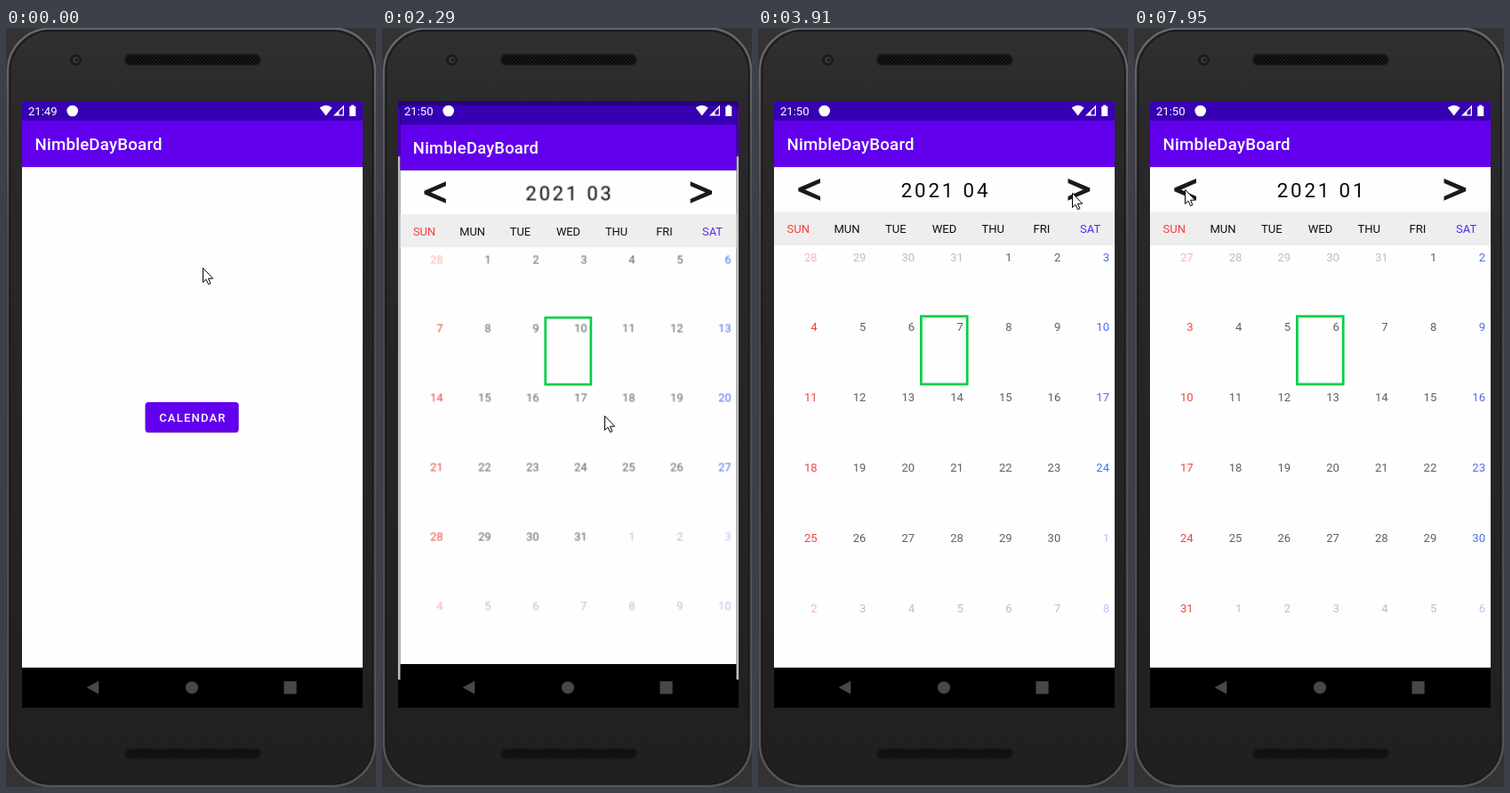
Write an HTML page that moves like this. It is 416 by 852 pixels and loops after 8 s.

```html
<!DOCTYPE html>
<html lang="en">
<head>
<meta charset="utf-8">
<title>Calendar demo</title>
<style>
  /* registered, so that the scaled text is redrawn sharply at every size */
  @property --zoom { syntax: "<number>"; inherits: false; initial-value: 1; }
  @property --fade { syntax: "<number>"; inherits: false; initial-value: 0; }

  html, body { margin: 0; width: 100%; height: 100%; overflow: hidden; background: #333; }
  svg { display: block; width: 416px; height: 852px; font-family: Roboto, sans-serif; }
  .mid { text-anchor: middle; }
  .title { font-size: 18.64px; font-weight: 500; letter-spacing: .0125em; fill: #fff; }
  .button { font-size: 13.05px; font-weight: 500; letter-spacing: .0893em; fill: #fff; }
  .clock { font-size: 13.05px; fill: #fff; }
  .head { font-size: 13.05px; fill: #111; }
  .head .sun { fill: #f5403c; }
  .head .sat { fill: #5a2cf5; }
  .name { font-size: 22.37px; letter-spacing: .125em; fill: #0a0a0a; }
  .day { font-size: 13.05px; text-anchor: end; fill: #5f5f5f; }
  .day.sun { fill: #ee4540; }
  .day.sat { fill: #4a6cec; }
  .day.out { opacity: .4; }

  /* every part shares one 8 s clock; 1% = 80 ms */
  .anim { animation: 8s step-end infinite; }
  #cursor { animation-name: cursor; }
  #early { animation-name: early; }
  #late { animation-name: late; }
  #prev { animation-name: press; }
  #m1 { animation-name: m1; }
  #m2 { animation-name: m2; }
  #m3 { animation-name: m3; }
  #m4 { animation-name: m4; }
  #home, #calendar { transform-origin: 209.5px 422px; transform: scale(var(--zoom)); }
  #home { animation: zoom-out 8s linear infinite; }
  #dim { opacity: var(--fade); animation: dim 8s linear infinite; }
  #calendar { opacity: var(--fade); animation: zoom-in 8s linear infinite, reveal 8s linear infinite; }
  #ripple { transform-origin: 250px 435px; animation: ripple 8s linear infinite; }

  @keyframes cursor {
    0%      { transform: translate(221px, 269px); }
    3.5%    { transform: translate(222px, 268px); animation-timing-function: steps(2); }
    5.5%    { transform: translate(224px, 266px); }
    12.125% { transform: translate(226px, 272px); animation-timing-function: steps(3); }
    15.125% { transform: translate(246px, 330px); animation-timing-function: steps(2); }
    17.125% { transform: translate(257px, 395px); animation-timing-function: steps(2); }
    19%     { transform: translate(249px, 426px); animation-timing-function: steps(2); }
    21%     { transform: translate(250px, 432px); }
    22.875% { transform: translate(250px, 435px); }
    33.5%   { transform: translate(252px, 428px); animation-timing-function: steps(4); }
    37.375% { transform: translate(284px, 325px); animation-timing-function: steps(4); }
    41.125% { transform: translate(321px, 227px); animation-timing-function: steps(2); }
    43%     { transform: translate(339px, 206px); }
    44%     { transform: translate(347px, 190px); }
    45%     { transform: translate(352px, 177px); }
    46%     { transform: translate(353px, 185px); }
    56.5%   { transform: translate(354px, 187px); }
    57.5%   { transform: translate(330px, 193px); animation-timing-function: steps(3); }
    60.375% { transform: translate(115px, 190px); }
    61.25%  { transform: translate(85px, 187px); }
    62.25%  { transform: translate(73px, 186px); }
    64.375% { transform: translate(72px, 185px); }
    65.25%  { transform: translate(69px, 184px); animation-timing-function: steps(3); }
    68.125%, 100% { transform: translate(57px, 181px); }
  }
  @keyframes early { 0% { opacity: 1; } 21%, 100% { opacity: 0; } }
  @keyframes late { 0% { opacity: 0; } 21%, 100% { opacity: 1; } }
  @keyframes press {
    0%, 70.25%, 77.875%, 85.875%, 99.375%, 100% { fill: #1a1a1a; }
    68.125%, 76%, 83.75%, 97.5% { fill: #3c3c3c; }
  }
  @keyframes m3 { 0%, 70.25% { opacity: 1; } 47.875%, 77.875%, 100% { opacity: 0; } }
  @keyframes m4 { 0%, 70.25%, 100% { opacity: 0; } 47.875% { opacity: 1; } }
  @keyframes m2 { 0%, 85.875%, 100% { opacity: 0; } 77.875% { opacity: 1; } }
  @keyframes m1 { 0% { opacity: 0; } 85.875%, 100% { opacity: 1; } }

  /* screen change: quick start, very slow finish */
  @keyframes zoom-out {
    0%, 26.65% { --zoom: 1; animation-timing-function: cubic-bezier(.3, 0, .8, .15); }
    27.483% { --zoom: 1.02; animation-timing-function: cubic-bezier(.05, .7, .1, 1); }
    31.65%, 100% { --zoom: 1.05; }
  }
  @keyframes zoom-in {
    0%, 26.65% { --zoom: .85; animation-timing-function: cubic-bezier(.3, 0, .8, .15); }
    27.483% { --zoom: .91; animation-timing-function: cubic-bezier(.05, .7, .1, 1); }
    31.65%, 100% { --zoom: 1; }
  }
  @keyframes reveal { 0%, 27.09% { --fade: 0; } 27.71%, 100% { --fade: 1; } }
  @keyframes dim { 0%, 26.65% { --fade: 0; } 28%, 100% { --fade: .25; } }
  @keyframes ripple {
    0%, 22.8% { transform: scale(0); opacity: .24; }
    25.7% { transform: scale(1); opacity: .24; }
    28%, 100% { transform: scale(1); opacity: 0; }
  }
</style>
</head>
<body>
<svg viewBox="0 0 416 852">
  <defs>
    <linearGradient id="body" x2="0" y2="1">
      <stop offset="0" stop-color="#303030"/>
      <stop offset=".12" stop-color="#292929"/>
      <stop offset="1" stop-color="#202020"/>
    </linearGradient>
    <linearGradient id="rim" x2="0" y2="1">
      <stop offset="0" stop-color="#6a6770"/>
      <stop offset=".3" stop-color="#484848"/>
      <stop offset="1" stop-color="#555"/>
    </linearGradient>
    <pattern id="mesh" width="4" height="4" patternUnits="userSpaceOnUse">
      <path d="M0 0h2v2H0zM2 2h2v2H2z" fill="#090909"/>
    </pattern>
    <clipPath id="screen"><path d="M18 82h383v681H18z"/></clipPath>
    <clipPath id="face"><rect x="156.600" y="420" width="105" height="34" rx="3.700"/></clipPath>
    <g id="speaker">
      <rect x="133" width="153.500" height="13" rx="6" fill="#181818"/>
      <rect x="135" y="2" width="149.500" height="9" rx="4" fill="url(#mesh)"/>
    </g>
    <g id="chrome">
      <path d="M18 82h383v681H18z"/>
      <path d="M18 82h383v22H18z" fill="#3700b3"/>
      <path d="M18 156h383v562H18z" fill="#fefefe"/>
      <path d="M18 156h383v1H18z" opacity=".13"/>
      <path d="M18 104h383v52H18z" fill="#6200ee"/>
      <text class="title" x="32.500" y="137">NimbleDayBoard</text>
    </g>
    <path id="chevron" d="M70 169v4.900L53 181.400 70 188.900v4.900L45.300 183.300v-3.800z"/>
  </defs>

  <rect x="2" y=".5" width="413" height="850.500" rx="48" fill="url(#body)" stroke="url(#rim)" stroke-width="2.500"/>
  <rect x="4.500" y="3" width="408" height="845.500" rx="46" fill="none" stroke="#1c1c1c" stroke-width="2"/>
  <circle cx="78.500" cy="36" r="6.500" fill="#1b1b1b"/>
  <circle cx="78.500" cy="36" r="3.500" fill="#343638"/>
  <circle cx="79.500" cy="36" r="1.500" fill="#151515"/>
  <use href="#speaker" y="29"/>
  <use href="#speaker" y="808"/>

  <g clip-path="url(#screen)">
    <g id="home">
      <use href="#chrome"/>
      <rect x="156.300" y="420.500" width="105.600" height="34.500" rx="4" opacity=".2"/>
      <rect x="156.600" y="420" width="105" height="34" rx="3.700" fill="#6200ee"/>
      <g clip-path="url(#face)"><circle id="ripple" cx="250" cy="435" r="96" fill="#fff"/></g>
      <text class="button mid" x="209.900" y="442">CALENDAR</text>
    </g>
    <path id="dim" d="M18 82h383v681H18z"/>

    <g id="calendar">
      <use href="#chrome"/>
      <path d="M18 206.500h383V244H18z" fill="#eee"/>
      <use id="prev" class="anim" href="#chevron"/>
      <use href="#chevron" transform="matrix(-1 0 0 1 418.500 0)" fill="#1a1a1a"/>
      <g id="head" class="head mid"></g>
      <g id="months"></g>
      <path d="M183.400 323.700h51.800v76.200h-51.800z" fill="none" stroke="#08d048" stroke-width="2.800"/>
    </g>

    <g fill="#fff">
      <text id="early" class="clock anim" x="25" y="98">21:49</text>
      <text id="late" class="clock anim" x="25" y="98">21:50</text>
      <circle cx="74.700" cy="93" r="6.300"/>
      <path d="M359.700 98.500 352.700 89.500Q359.700 84 366.700 89.500z"/>
      <path fill-rule="evenodd" d="M380 86.500V98.500H368zM378.700 89.700 374.500 94V97.200h4.200z"/>
      <path d="M388 86.500h3.500V88h1.700v11h-7V88H388z"/>
    </g>
    <g fill="#484848">
      <path d="M104.300 732.800v15L90.700 740.300z"/>
      <circle cx="209" cy="740.400" r="7"/>
      <path d="M312.400 733.300h14.200v14.200h-14.200z"/>
    </g>
  </g>

  <g id="cursor" class="anim">
    <path d="M.5.500V16.500L4 13.200 6.600 18.700 8.900 17.700 6.500 12.200H11.700z" fill="#fff" stroke="#000"/>
  </g>
</svg>
<script>
  const NS = "http://www.w3.org/2000/svg";
  const $ = id => document.getElementById(id);
  const COL = 383 / 7, ROW = 78.85;

  function add(parent, tag, attrs, text = "") {
    const el = document.createElementNS(NS, tag);
    for (const key in attrs) el.setAttribute(key, attrs[key]);
    el.textContent = text;
    return parent.appendChild(el);
  }

  const weekend = col => col === 0 ? "sun" : col === 6 ? "sat" : "";

  ["SUN", "MUN", "TUE", "WED", "THU", "FRI", "SAT"].forEach((label, col) =>
    add($("head"), "text", { class: weekend(col), x: 18 + COL * (col + .5), y: 230 }, label));

  function addMonth(month) {
    const group = add($("months"), "g", { id: "m" + month, class: "anim" });
    add(group, "text", { class: "name mid", x: 211, y: 190 }, "2021 0" + month);
    const lead = new Date(2021, month - 1, 1).getDay();
    for (let i = 0; i < 42; i++) {
      const date = new Date(2021, month - 1, 1 - lead + i);
      const col = i % 7, row = Math.floor(i / 7);
      const out = date.getMonth() === month - 1 ? "" : "out";
      add(group, "text", {
        class: `day ${weekend(col)} ${out}`,
        x: 18 + COL * (col + 1) - 6,
        y: Math.round(261.6 + ROW * row)
      }, date.getDate());
    }
  }
  [1, 2, 3, 4].forEach(addMonth);
</script>
</body>
</html>
```
